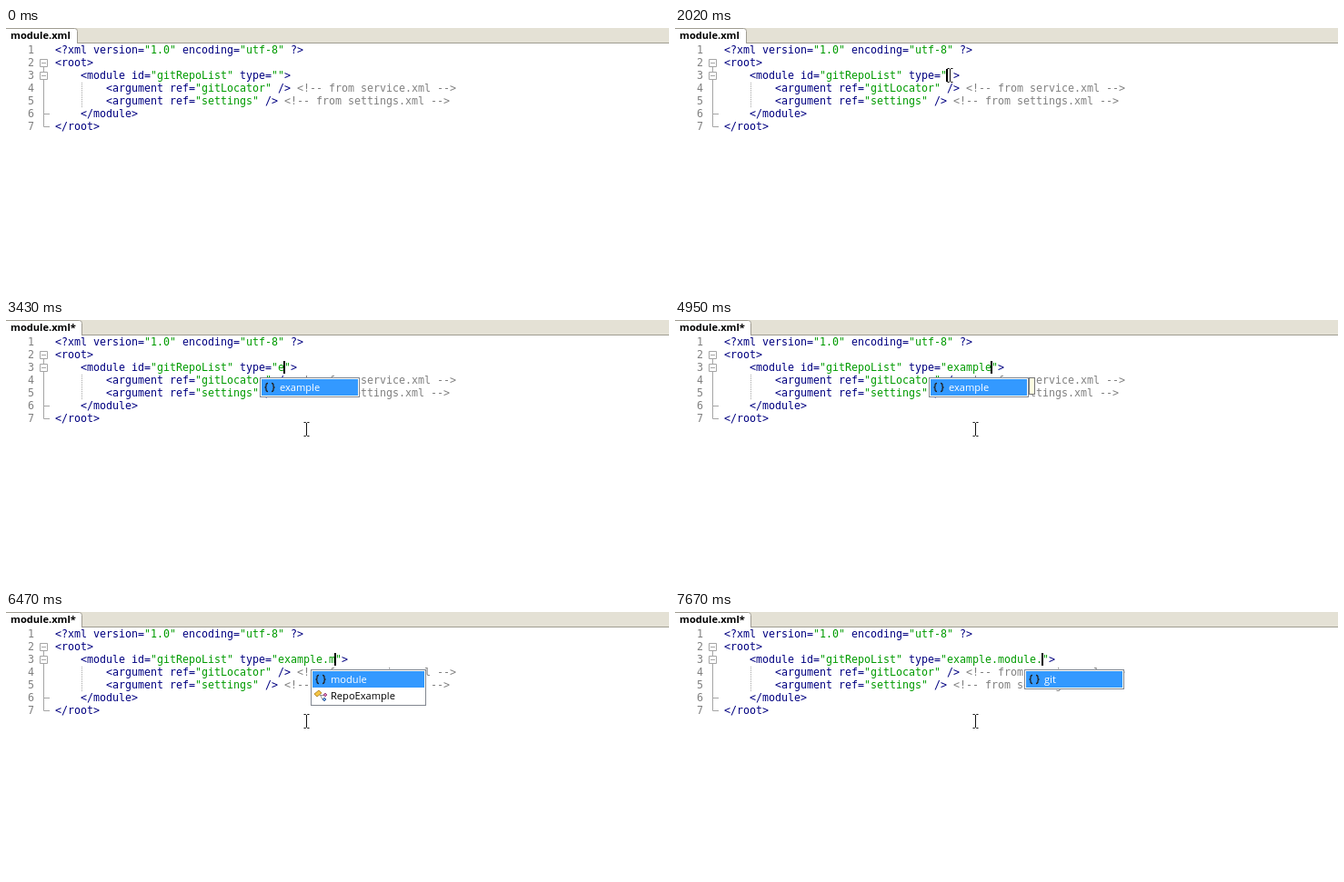
An HTML page that plays this animation: 729 px wide and 290 px high, repeating every 8 s.

```html
<!DOCTYPE html>
<html lang="en">
<head>
<meta charset="utf-8">
<title>Code completion in module.xml</title>
<style>
  html, body { margin: 0; width: 100%; height: 100%; overflow: hidden; background: #fff; }
  svg { display: block; }
  text { white-space: pre; }
  .code { font: 11.63px "DejaVu Sans Mono", monospace; fill: #000080; }
  .str { fill: #009b00; }
  .rem, .num { fill: #808080; }
  .ui { font: 11.1px "Open Sans", "Noto Sans", sans-serif; }
  #title { font-weight: bold; }
  .line { fill: none; stroke: #a5a5a5; }
  .edge { stroke: #a09d92; }
</style>
</head>
<body>
<svg width="729" height="290" viewBox="0 0 729 290">
  <rect width="729" height="17" fill="#e4e1d5"/>
  <path class="edge" d="M0 16.5H729"/>
  <path id="tab" class="edge" fill="#fff"/>
  <text id="title" class="ui" x="5" y="12"></text>
  <path class="line" d="M37.5 34.5h8v8h-8zM39 38.5h5M37.5 48.5h8v8h-8zM39 52.5h5M41.5 43v5M41.5 57V108.5H48M41.5 94.5H48"/>
  <path class="line" d="M83.5 60V88" stroke-dasharray="1 1"/>
  <g id="code" class="code"></g>
  <g id="popup" class="ui"></g>
  <rect id="tip" x="389.5" y="63.5" width="6" height="18" fill="#ffffe1" stroke="#767676"/>
  <rect id="caret" y="45" width="2" height="14"/>
  <g id="mouse" fill="none">
    <path d="M.5-6V6" stroke="#fff" stroke-width="3"/>
    <path d="M-2.5-7.5h2l1 1l1-1h2M.5-7V7M-2.5 7.5h2l1-1l1 1h2" stroke="#111"/>
  </g>
</svg>
<script>
const LOOP = 8000, CHAR = 7, TYPE_X = 299;
const WORD = 'example.module.';
const $ = id => document.getElementById(id);

const lines = [
  '<?xml version="1.0" encoding="utf-8" ?>',
  '<root>',
  '    <module id="gitRepoList" type="">',
  '        <argument ref="gitLocator" /> <!-- from service.xml -->',
  '        <argument ref="settings" /> <!-- from settings.xml -->',
  '    </module>',
  '</root>'
];

// [time, number of characters of WORD entered]
const typing = [[0, 0], [3270, 1], [3830, 2], [4390, 3], [4470, 4], [4630, 5], [4790, 6],
  [4950, 7], [5350, 8], [6470, 9], [7190, 14], [7510, 15]];
// The caret turns on and off in turn
const blinks = [1560, 2100, 2730, 4230, 4390, 5750, 6150, 6950, 7510];
// [time, x, width, items]
const popups = [[0], [3430, 279, 110, ['example']], [5350],
  [5670, 335, 127, ['module', 'config', 'helper', 'service', 'RepoExample']],
  [6470, 335, 127, ['module', 'RepoExample']], [7190], [7670, 384, 110, ['git']]];
// [start, step length, steps, four Bezier points]
const moves = [
  [300, 78, 11, [400, 261], [330, 150], [282, 80], [308, 48]],
  [1170, 70, 2, [308, 48], [308, 48], [306, 49], [306, 49]],
  [1560, 75, 3, [306, 49], [305, 50], [303, 51], [302, 52]],
  [2020, 78, 7, [302, 52], [306, 62], [326, 108], [330, 120]]
];

const latest = (list, t) => list.filter(e => e[0] <= t).pop();
const escapeXml = s => s.replace(/&/g, '&amp;').replace(/</g, '&lt;');

function highlight(s) {
  return s.trim().split(/(<!--.*-->|"[^"]*")/).map(part => {
    const kind = part[0] === '"' ? 'str' : part.startsWith('<!--') ? 'rem' : '';
    return `<tspan class="${kind}">${escapeXml(part)}</tspan>`;
  }).join('');
}

$('code').innerHTML = lines.map((s, i) => {
  const y = 28 + 14 * i, indent = s.search(/\S/);
  return `<text class="num" x="24" y="${y}">${i + 1}</text>` +
    `<text id="row${i}" x="${54 + CHAR * indent}" y="${y}">${highlight(s)}</text>`;
}).join('');

function icon(name, x, y) {
  if (/^[a-z]/.test(name)) {
    return `<path transform="translate(${x + 7} ${y + 4.5})" fill="none" stroke="#222" stroke-width="1.3"` +
      ' d="M2 0q-2 0-2 2v1q0 1.500-1.500 1.500q1.500 0 1.500 1.500v1q0 2 2 2' +
      'M6 0q2 0 2 2v1q0 1.500 1.500 1.500q-1.500 0-1.500 1.500v1q0 2-2 2"/>';
  }
  return `<g transform="translate(${x + 4} ${y + 2})" stroke-width=".8">` +
    '<path d="M6 6.500h5M7 7l2 4h2" fill="none" stroke="#777"/>' +
    '<path d="M0 5l5-4l3 3l-5 4z" fill="#f4c443" stroke="#a87918"/>' +
    '<path d="M10 6l2-2l2 2l-2 2z" fill="#d87ab8" stroke="#8d3c74"/>' +
    '<path d="M9 11l2-2l2 2l-2 2z" fill="#6f9fe0" stroke="#2c5695"/></g>';
}

function popupMarkup([, x, w, items]) {
  if (!items) return '';
  return `<rect x="${x + .5}" y="63.5" width="${w - 1}" height="${items.length * 18 + 3}" fill="#fff" stroke="#828790"/>` +
    `<rect x="${x + 2}" y="65" width="${w - 4}" height="18" fill="#39f"/>` +
    items.map((name, i) => {
      const y = 65 + 18 * i;
      return icon(name, x, y) +
        `<text x="${x + 22}" y="${y + 13}" fill="${i ? '#000' : '#fff'}">${name}</text>`;
    }).join('');
}

function mouseAt(t) {
  const move = latest(moves, t);
  if (!move) return null;
  const [start, step, count, a, b, c, d] = move;
  const linear = Math.min(1, Math.floor((t - start) / step) / (count - 1));
  const u = linear * (2 - linear), v = 1 - u;
  return [0, 1].map(k => Math.round(
    v * v * v * a[k] + 3 * v * v * u * b[k] + 3 * v * u * u * c[k] + u * u * u * d[k]));
}

const show = (id, on) => $(id).setAttribute('visibility', on ? 'visible' : 'hidden');
let shownLength, shownPopup;

function draw(t) {
  const length = latest(typing, t)[1];
  if (length !== shownLength) {
    shownLength = length;
    $('row2').innerHTML = highlight(lines[2].replace('""', `"${WORD.slice(0, length)}"`));
    $('title').textContent = 'module.xml' + (length ? '*' : '');
    $('tab').setAttribute('d', `M-1 17V.5H${length ? 80.5 : 75.5}q3 0 3 3V17`);
    $('caret').setAttribute('x', TYPE_X - 1 + CHAR * length);
  }
  const popup = latest(popups, t);
  if (popup !== shownPopup) {
    shownPopup = popup;
    $('popup').innerHTML = popupMarkup(popup);
  }
  show('caret', blinks.filter(b => b <= t).length % 2);
  show('tip', t >= 4230 && t < 5350);
  const mouse = mouseAt(t);
  show('mouse', mouse);
  if (mouse) $('mouse').setAttribute('transform', `translate(${mouse})`);
}

const begin = performance.now();
function tick() {
  draw((performance.now() - begin) % LOOP);
  requestAnimationFrame(tick);
}
tick();
</script>
</body>
</html>
```
